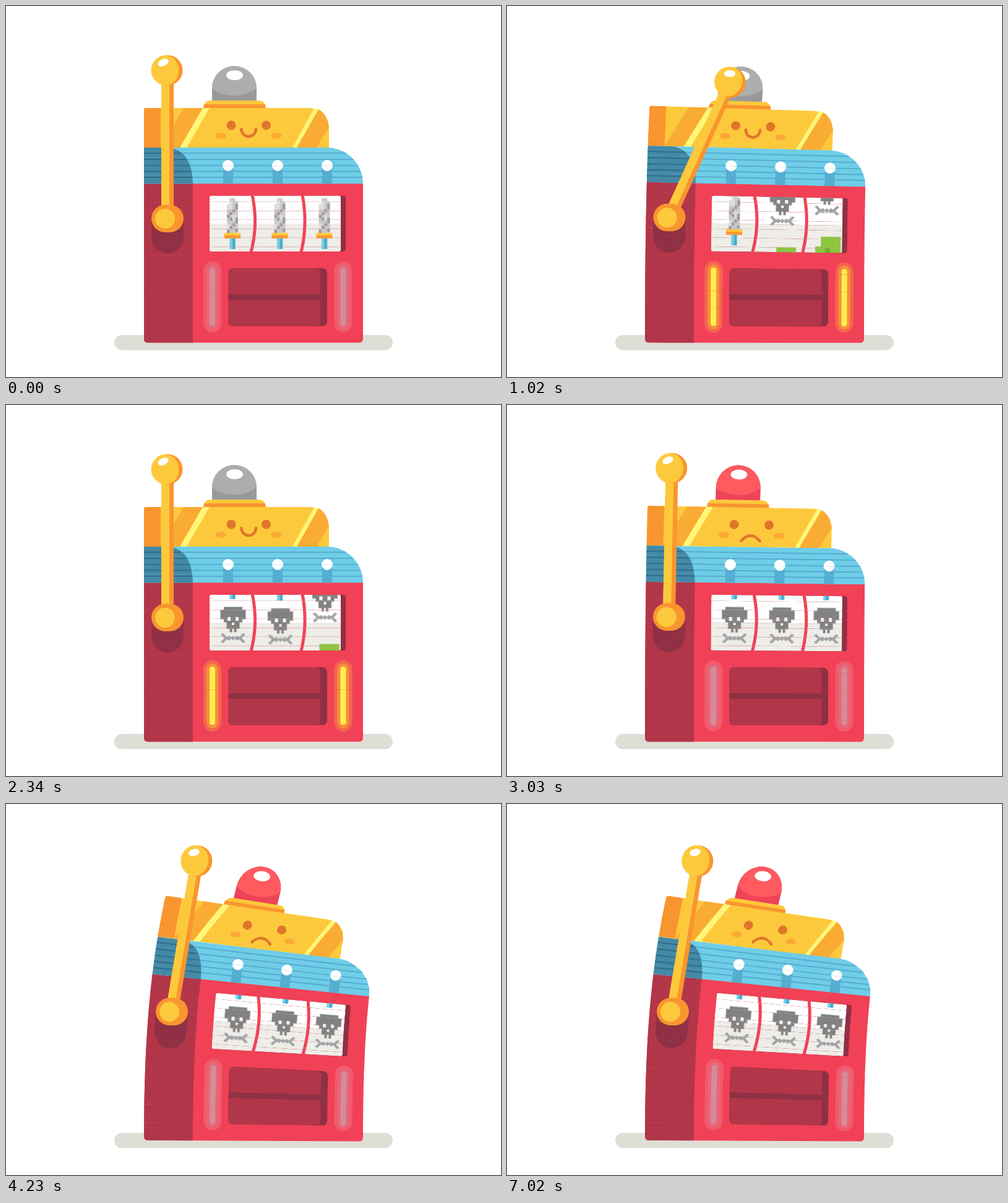
An HTML page without scripts for the animation above (7.11 s loop, 800x600 px).

```html
<!DOCTYPE html>
<html lang="en">
<head>
<meta charset="utf-8">
<title>Slot machine</title>
<style>
@property --bend { syntax: "<number>"; inherits: true; initial-value: 0; }
@property --lever { syntax: "<angle>"; inherits: true; initial-value: 0deg; }
@property --reel1 { syntax: "<length>"; inherits: true; initial-value: 0px; }
@property --reel2 { syntax: "<length>"; inherits: true; initial-value: 0px; }
@property --reel3 { syntax: "<length>"; inherits: true; initial-value: 0px; }
@property --lit { syntax: "<number>"; inherits: true; initial-value: 0; }
@property --sad { syntax: "<number>"; inherits: true; initial-value: 0; }
@property --alarm { syntax: "<number>"; inherits: true; initial-value: 0; }

html, body { margin: 0; width: 100%; height: 100%; overflow: hidden; background: #fff; }
body {
  position: relative;
  animation: 7110ms linear infinite;
  animation-name: bend, lever, reel1, reel2, reel3, mood, alarm;
}
svg { position: absolute; left: 0; top: 0; width: 800px; height: 600px; }
.defs { width: 0; height: 0; }

/* Horizontal bands with centre height --s and half-height --h; higher bands lean more. */
.band {
  --shift: calc(var(--s) * var(--s) * (.00013 + .0000003 * var(--s)));
  --slope: calc(var(--s) * (.00026 + .0000009 * var(--s)));
  --squeeze: calc(.00000016 * var(--s) * var(--s));
  --tilt: calc(.000385 * var(--s));
  --sag: calc(.00000003 * var(--s) * var(--s) * var(--s));
  clip-path: inset(calc((543.3 - var(--s) - var(--h)) * 1px) 0 calc((55.3 + var(--s) - var(--h)) * 1px) 0);
  transform-origin: 0 0;
  transform: matrix(
    calc(1 - var(--bend) * var(--squeeze)),
    calc(var(--bend) * var(--tilt)),
    calc(0 - var(--bend) * var(--slope)),
    1,
    calc(var(--bend) * (var(--shift) + var(--slope) * (544 - var(--s)) + 223 * var(--squeeze))),
    calc(var(--bend) * (var(--sag) - 350 * var(--tilt))));
}
.dome { --h: 60; }
.sign { --h: 8; }
.roof, .window { --h: 7.25; }
.base { --h: 14.2; }

.handle { transform: translate(calc(var(--bend) * 7px), calc(var(--bend) * -8px)); }
.lever {
  transform: rotate(calc(var(--lever) + var(--bend) * 9.5deg)) scaleY(calc(1 + .03 * var(--sad) * var(--bend)));
  transform-origin: 261px 344px;
}
.reel1 { transform: translateY(var(--reel1)); }
.reel2 { transform: translateY(var(--reel2)); }
.reel3 { transform: translateY(var(--reel3)); }
.lit { opacity: var(--lit); }
.sad { opacity: var(--sad); }
.happy { opacity: calc(1 - var(--sad)); }
.alarm { opacity: var(--alarm); }

@keyframes bend {
  0% { --bend: 0; animation-timing-function: ease-in-out; }
  8.86%, 9.85% { --bend: .55; animation-timing-function: ease-in-out; }
  18.3% { --bend: -.05; animation-timing-function: ease-in-out; }
  22.5% { --bend: 0; }
  38.82% { --bend: 0; animation-timing-function: cubic-bezier(.4, 0, .45, 1); }
  56.12%, 100% { --bend: 1; }
}
@keyframes lever {
  0% { --lever: 0deg; animation-timing-function: ease-in-out; }
  8.86%, 9.85% { --lever: 68.8deg; animation-timing-function: ease-in-out; }
  17.6% { --lever: -4deg; animation-timing-function: ease-in-out; }
  21.3%, 100% { --lever: 0deg; }
}
@keyframes reel1 {
  0%, 5.63% { --reel1: 0px; animation-timing-function: cubic-bezier(.33, 0, .67, .33); }
  8.86% { --reel1: 74px; }
  20.25% { --reel1: 633px; animation-timing-function: ease-in-out; }
  22.8%, 100% { --reel1: 621px; }
}
@keyframes reel2 {
  0%, 6.05% { --reel2: 0px; animation-timing-function: cubic-bezier(.33, 0, .67, .33); }
  8.86% { --reel2: 61px; }
  21.52% { --reel2: 473px; }
  31.2% { --reel2: 981px; animation-timing-function: ease-in-out; }
  33.8%, 100% { --reel2: 971px; }
}
@keyframes reel3 {
  0%, 6.6% { --reel3: 0px; animation-timing-function: cubic-bezier(.33, 0, .67, .33); }
  8.86% { --reel3: 41px; }
  21.52% { --reel3: 457px; }
  32.91% { --reel3: 937px; }
  34.2% { --reel3: 981px; animation-timing-function: ease-in-out; }
  36.7%, 100% { --reel3: 971px; }
}
@keyframes mood {
  0% { --lit: 0; --sad: 0; animation-timing-function: step-end; }
  5.63% { --lit: 1; --sad: 0; animation-timing-function: step-end; }
  38%, 100% { --lit: 0; --sad: 1; }
}
@keyframes alarm {
  0%, 59.07%, 63.29%, 68.78%, 73.84%, 78.06%, 83.54%, 88.61%, 92.83%, 98.31% {
    --alarm: 0; animation-timing-function: step-end;
  }
  38%, 59.49%, 63.71%, 69.2%, 74.26%, 78.48%, 83.97%, 89.03%, 93.25%, 98.73%, 100% {
    --alarm: 1; animation-timing-function: step-end;
  }
}
</style>
</head>
<body>
<svg class="defs">
  <defs>
    <clipPath id="glass"><rect x="329" y="307" width="212" height="90" rx="3"/></clipPath>

    <!-- One turn of a reel: skull, leaf, seven, sword -->
    <pattern id="symbols" patternUnits="userSpaceOnUse" x="-30" y="48" width="60" height="350">
      <g transform="translate(30 -48)">
        <g transform="translate(0 352)">
          <path fill="#c9c9c9" d="M-4.5-41H4.5V-36.5H9V15H-9V-32H-4.5Z"/>
          <path fill="#dedede" d="M-4.5-36.5H0V-23H-9V-32H-4.5ZM0-14H4.5V-5H0ZM-9 0H-4.5V9H-9Z"/>
          <path fill="#9b9b9b" d="M4.5-32H9V-23H4.5ZM0-23H4.5V-18.500H0ZM-4.5-18.500H0V-14H-4.5ZM-9-14H-4.5V-9.500H-9ZM4.5-9.500H9V-.5H4.5ZM0-.5H4.5V4H0ZM-4.5 4H0V8.500H-4.5ZM-9 10H-4.5V15H-9ZM-4.5-9.500H0V-5H-4.5ZM4.5 8.500H9V13H4.5Z"/>
          <path fill="#f9952f" d="M-13 15H13V24H-13Z"/>
          <path fill="#fdc93c" d="M-13 15H13V19H-13Z"/>
          <path fill="#6ecde9" d="M-4.5 24H4.5V41H-4.5Z"/>
          <path fill="#4aaacb" d="M0 24H4.5V41H0Z"/>
        </g>
        <g transform="translate(0 260)">
          <path fill="#4aaacb" d="M10.500-16.500H20.500V-6H10.500ZM0-6H10.500V5H0ZM-10.500 5H0V26H-10.500Z"/>
          <path fill="#6ecde9" d="M-20.500-26.500H20.500V-16H-20.500Z"/>
        </g>
        <g transform="translate(0 170)">
          <path fill="#8cc63f" d="M-8-21H24V6H14V22H-17V-5H-8Z"/>
          <path fill="#6fae2e" d="M-25 22H-17V30H-25ZM-17 14H-9V22H-17ZM-9 6H-1V14H-9ZM-1-2H7V6H-1Z"/>
        </g>
        <g transform="translate(1 85)">
          <path fill="#828282" fill-rule="evenodd" d="M-15-29.500H15V-24.500H20.500V-9.500H15V-4.500H10.500V6H5.500V11.500H1.500V6H-1.500V11.500H-5.500V6H-10.500V-4.500H-15V-9.500H-20.500V-24.500H-15ZM-9-13V-7H-4V-13ZM4-13V-7H9V-13ZM-2-4V0H2V-4Z"/>
          <path fill="#a1a4a6" d="M-20 15l4-2 6 6 4-2 3 3 3-3 3 3 3-3 4 2 6-6 4 2-6 6 6 6-4 2-6-6-4 2-3-3-3 3-3-3-3 3-4-2-6 6-4-2 6-6Z"/>
        </g>
      </g>
    </pattern>
    <rect id="reel" x="-30" y="-1000" width="60" height="1398" fill="url(#symbols)"/>

    <g id="lamp">
      <rect x="-14.500" y="413" width="29" height="115" rx="14.500" fill="#f25a6c"/>
      <rect x="-9.500" y="418" width="19" height="105" rx="9.500" fill="#e5687a"/>
      <rect x="-4.500" y="423" width="9" height="95" rx="4.500" fill="#d68c97"/>
      <g class="lit">
        <rect x="-14.500" y="413" width="29" height="115" rx="14.500" fill="#f3664d"/>
        <rect x="-9.500" y="418" width="19" height="105" rx="9.500" fill="#f98e3c"/>
        <rect x="-4.500" y="423" width="9" height="95" rx="4.500" fill="#ffee4d"/>
      </g>
    </g>

    <g id="sign">
      <path fill="#fdc93c" d="M223 229V168q0-3 3-3H491Q519 167 522 196V229Z"/>
      <path fill="#f9952f" d="M223 229V168q0-3 3-3H250V229Z"/>
      <path fill="#f9ab33" d="M287 165H318L281 229H250ZM505 167Q519 174 522 196L502 229H470Z"/>
      <path fill="#fff67a" d="M318 165H329L292 229H281ZM498 165.500L505 167 470 229H463Z"/>
      <path fill="none" stroke="#e0752c" stroke-width="15" stroke-linecap="round" d="M364 193h.01M420.500 193h.01"/>
      <ellipse cx="347.500" cy="210" rx="8.500" ry="5" fill="#fbaa35"/>
      <ellipse cx="437" cy="210" rx="8.500" ry="5" fill="#fbaa35"/>
      <g fill="none" stroke="#e0752c" stroke-width="4.500" stroke-linecap="round">
        <path class="happy" d="M380.500 199a11.700 12 0 0 0 23.400 0"/>
        <path class="sad" d="M376 219q15-17 30 0"/>
      </g>
    </g>

    <g id="roof">
      <path fill="#6fcde8" d="M223 229H518C552 229 577 256 577 287.500H223Z"/>
      <path stroke="#55add0" stroke-width="2" d="M280 238H549M290 248H561M295 258H569M298 267.500H573M300 277H576"/>
      <path fill="#4489a5" d="M223 229H262Q301 233 302 287.500H223Z"/>
      <path stroke="#2f6c8b" stroke-width="2" d="M223 238H283M223 248H291M223 258H296M223 267.500H299M223 277H301"/>
      <path fill="#55add0" d="M351 258H367V287.500H351ZM431 258H447V287.500H431ZM511 258H527V287.500H511Z"/>
      <path fill="none" stroke="#fff" stroke-width="18" stroke-linecap="round" d="M359 258h.01M439 258h.01M519 258h.01"/>
    </g>

    <g id="body">
      <path fill="#f14156" d="M223 287H577V538q0 6.500-6 6.500H229q-6 0-6-6.500Z"/>
      <path fill="#b23649" d="M223 287H302V544.500H229q-6 0-6-6.500Z"/>
    </g>

    <g id="window">
      <use href="#body"/>
      <path fill="#8f3044" d="M235 344H287V374a26 26 0 0 1-52 0Z"/>
      <rect x="335" y="307" width="214" height="90" rx="4" fill="#8f3044"/>
      <g clip-path="url(#glass)">
        <path fill="#fff" d="M329 307H541V352H329Z"/>
        <path fill="#eeede8" d="M329 352H541V397H329Z"/>
        <g class="reel1"><use href="#reel" x="366"/></g>
        <g class="reel2"><use href="#reel" x="442.500"/></g>
        <g class="reel3"><use href="#reel" x="514.500"/></g>
        <path fill="none" stroke="#f14156" stroke-width="5" d="M398 306Q408 352 396 398M479 306Q488 352 477 398"/>
      </g>
    </g>

    <g id="base">
      <use href="#body"/>
      <use href="#lamp" x="333.500"/><use href="#lamp" x="545"/>
      <rect x="359" y="424" width="160" height="94" rx="8" fill="#8f3044"/>
      <path fill="#b23649" d="M367 424H500q8 0 8 8V466H359V432q0-8 8-8ZM359 475H508V510q0 8-8 8H367q-8 0-8-8Z"/>
    </g>
  </defs>
</svg>

<svg><rect x="175" y="532" width="450" height="24.500" rx="12.200" fill="#dfded6"/></svg>

<svg class="band base" style="--s:13.2"><use href="#base"/></svg>
<svg class="band base" style="--s:41.6"><use href="#base"/></svg>
<svg class="band base" style="--s:70"><use href="#base"/></svg>
<svg class="band base" style="--s:98.4"><use href="#base"/></svg>
<svg class="band base" style="--s:126.8"><use href="#base"/></svg>

<svg class="band window" style="--s:148.25"><use href="#window"/></svg>
<svg class="band window" style="--s:162.75"><use href="#window"/></svg>
<svg class="band window" style="--s:177.25"><use href="#window"/></svg>
<svg class="band window" style="--s:191.75"><use href="#window"/></svg>
<svg class="band window" style="--s:206.25"><use href="#window"/></svg>
<svg class="band window" style="--s:220.75"><use href="#window"/></svg>
<svg class="band window" style="--s:235.25"><use href="#window"/></svg>
<svg class="band window" style="--s:249.75"><use href="#window"/></svg>

<svg class="band dome" style="--s:395">
  <path fill="#999" d="M333 154V133a36 36 0 0 1 72 0V154Z"/>
  <path fill="#adadad" d="M333 133a36 36 0 0 1 72 0Q391 145 369 145T333 133Z"/>
  <g class="alarm">
    <path fill="#ee4358" d="M333 154V133a36 36 0 0 1 72 0V154Z"/>
    <path fill="#ff5a5f" d="M333 133a36 36 0 0 1 72 0Q391 145 369 145T333 133Z"/>
  </g>
  <ellipse cx="369.500" cy="112" rx="13.500" ry="8" fill="#fff"/>
  <path fill="#fdc93c" d="M319 166Q320 153 330 153H409Q419 153 420 166Z"/>
  <path fill="#f9952f" d="M319 166L320 159H419L420 166Z"/>
</svg>

<svg class="band sign" style="--s:323"><use href="#sign"/></svg>
<svg class="band sign" style="--s:339"><use href="#sign"/></svg>
<svg class="band sign" style="--s:355"><use href="#sign"/></svg>
<svg class="band sign" style="--s:371"><use href="#sign"/></svg>

<svg class="band roof" style="--s:264.25"><use href="#roof"/></svg>
<svg class="band roof" style="--s:278.75"><use href="#roof"/></svg>
<svg class="band roof" style="--s:293.25"><use href="#roof"/></svg>
<svg class="band roof" style="--s:307.75"><use href="#roof"/></svg>

<svg class="handle">
  <g class="lever">
    <path fill="#f9952f" d="M251 110H271V344H251Z"/>
    <path fill="#fdc93c" d="M251 110H264V344H251Z"/>
    <circle cx="261" cy="104" r="24.500" fill="#f9952f"/>
    <path fill="#fdc93c" d="M259 79.500a24.500 24.500 0 0 0 0 49C286 124 286 84 259 79.500Z"/>
    <ellipse cx="254" cy="91.500" rx="9" ry="5.500" fill="#fff" transform="rotate(-25 254 91.500)"/>
  </g>
  <rect x="235" y="321.500" width="52" height="44.500" rx="22.200" fill="#f9952f"/>
  <circle cx="257" cy="344" r="16" fill="#fdc93c"/>
</svg>
</body>
</html>
```
